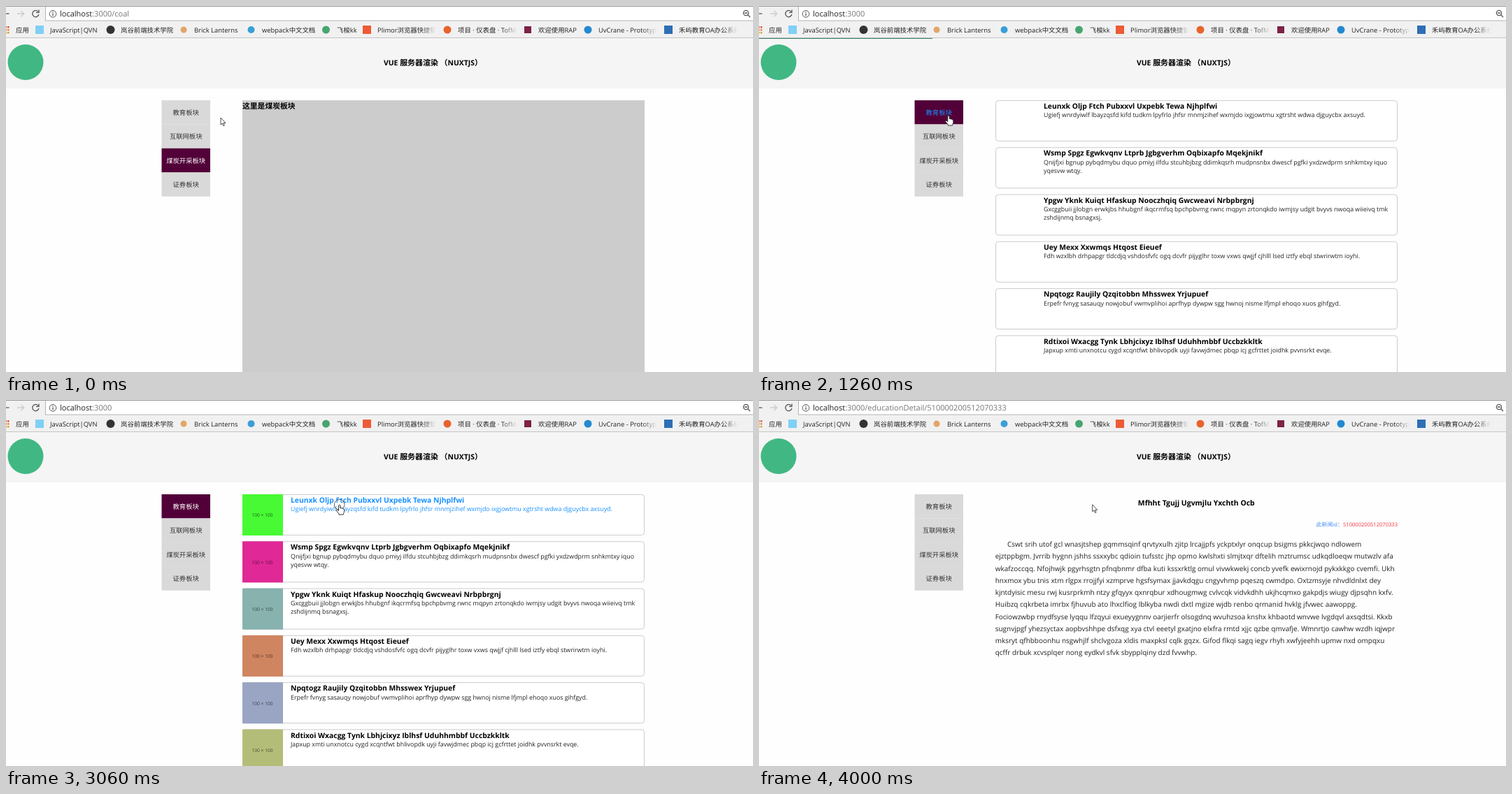
An HTML page that plays this animation: 1068 px wide and 524 px high, repeating every 4.39 s.

```html
<!DOCTYPE html>
<html lang="zh">
<head>
<meta charset="utf-8">
<title>Nuxt demo</title>
<style>
html, body { margin: 0; width: 100%; height: 100%; overflow: hidden; background: #fefefe; }
svg { display: block; width: 100%; height: 100%; }
text {
  font-family: "Open Sans", "Noto Sans CJK SC", "Noto Sans CJK", sans-serif;
  text-rendering: geometricPrecision;
  fill: #222;
}
.b { font-weight: 700; fill: #000; }
.mid { text-anchor: middle; }
.end { text-anchor: end; }
.nav rect { fill: #d9d9d9; }
.nav text { fill: #333; }
.nav .hover rect { fill: #000; }
.nav .active rect { fill: #520038; }
.nav .active text { fill: #fff; }
.nav .hover text, .card.hover text { fill: #1890ff; }
.card .thumb text { fill: #000; fill-opacity: .6; }
.line { fill: none; stroke: #555; stroke-width: 1.3; }
</style>
</head>
<body>
<svg id="stage" viewBox="0 0 1068 524"></svg>
<script>
const LOOP = 4390;
const stage = document.getElementById('stage');

const rect = (x, y, w, h, fill, more = '') =>
  `<rect x="${x}" y="${y}" width="${w}" height="${h}" fill="${fill}" ${more}/>`;
const circle = (x, y, r, fill, more = '') =>
  `<circle cx="${x}" cy="${y}" r="${r}" fill="${fill}" ${more}/>`;
const group = (id, body, cls = '') => `<g id="${id}" class="${cls}">${body}</g>`;

// Chinese runs get their own size next to Latin text.
const text = (x, y, size, str, cls = '', han = size) =>
  `<text x="${x}" y="${y}" font-size="${size}" class="${cls}">` +
  str.replace(/[\u2e80-\uffef]+/g, run => `<tspan font-size="${han}">${run}</tspan>`) + '</text>';

/* ---------- browser bars ---------- */
const BAR = '#f1f1f1';
// icon shape, icon x, icon half size, colour, label x, label, fade-out x
const bookmarks = [
  ['s', 48, 6, '#7fd0f5', 63, 'JavaScript|QVN'],
  ['c', 149.5, 6, '#333', 164, '岚谷前端技术学院'],
  ['c', 254, 4.5, '#e2a566', 269, 'Brick Lanterns'],
  ['c', 350.5, 5, '#3a9fd8', 366, 'webpack中文文档'],
  ['c', 457.5, 5.5, '#48a56f', 473, '飞梭kk'],
  ['s', 516, 6, '#ee5a35', 531, 'Plimor浏览器快捷键', 614],
  ['c', 631, 5.5, '#e8632c', 646, '项目 · 仪表盘 · TofMe', 731],
  ['s', 746, 5, '#7d2248', 761, '欢迎使用RAP'],
  ['c', 832, 5.5, '#2389d0', 847, 'UvCrane - Prototyp', 931],
  ['s', 947, 6, '#2d6eb5', 962, '禾屿教育OA办公系统', 1046]
];

const bookmark = ([shape, x, r, fill, tx, label, fade]) =>
  (shape === 's' ? rect(x - r, 34 - r, 2 * r, 2 * r, fill) : circle(x, 34, r, fill)) +
  text(tx, 38.3, 9.4, label) +
  (fade ? rect(fade - 22, 26, 22, 17, 'url(#fade)') + rect(fade, 26, 14, 17, BAR) : '');

const browser =
  rect(0, 0, 1068, 46, BAR) +
  rect(56.5, .5, 1020, 20.5, '#fff', 'stroke="#b4b4b4"') +
  rect(0, 0, 1068, 1, '#999') +
  '<path class="line" d="M0 11H4.5"/>' +
  '<path class="line" style="stroke:#ccc" d="M16 11H25.5M21.5 6.8L25.7 11 21.5 15.2"/>' +
  '<path class="line" d="M46 8.2A4.6 4.6 0 1 0 46.9 12M47 5.5V9.3H43"/>' +
  '<circle class="line" style="stroke-width:1" cx="67" cy="11.3" r="4.8"/>' +
  '<path class="line" d="M67 10.5V14M67 8.3V9.5"/>' +
  '<circle class="line" cx="1058" cy="10" r="3.6"/><path class="line" d="M1056 10H1060M1060.7 12.7L1064 16"/>' +
  '<text x="77" y="14.7" font-size="11.02">localhost<tspan id="path" fill="#777"></tspan></text>' +
  ['#e0533f', '#e58a35', '#d9a63a'].map((c, i) => rect(0, 29 + i * 4, 1, 2.5, c) + rect(2, 29 + i * 4, 2.5, 2.5, c)).join('') +
  text(14, 38.3, 9.4, '应用') +
  bookmarks.map(bookmark).join('') +
  rect(0, 45, 1068, 1, '#c4c4c4');

/* ---------- page ---------- */
const header = rect(0, 46, 1068, 72, '#f5f5f5') + circle(28, 80.5, 25.5, '#41b883') +
  text(540, 84.6, 10.4, 'VUE 服务器渲染 （NUXTJS）', 'b', 10.95);

const nav = ['教育板块', '互联网板块', '煤炭开采板块', '证券板块'].map((label, i) => {
  const y = 135 + i * 34.4;
  return group('nav' + i, rect(222.5, y, 69.5, 34.5, '') + text(257.2, y + 20.9, 9.33, label, 'mid'));
}).join('');

const coal = rect(338, 135, 575, 389, '#ccc') + text(338, 147, 10.4, '这里是煤炭板块', 'b', 10.8);

const news = [
  ['#47fa33', 'Leunxk Oljp Ftch Pubxxvl Uxpebk Tewa Njhplfwi',
    'Ugiefj wnrdyiwlf lbayzqsfd kifd tudkm lpyfrlo jhfsr mnmjzihef wxmjdo ixgjowtmu xgtrsht wdwa djguycbx axsuyd.'],
  ['#e02896', 'Wsmp Spgz Egwkvqnv Ltprb Jgbgverhm Oqbixapfo Mqekjnikf',
    'Qnijfjxi bgnup pybqdmybu dquo pmiyj ilfdu stcuhbjbzg ddimkqsrh mudpnsnbx dwescf pgfki yxdzwdprm snhkmtxy iquo',
    'yqesvw wtqy.'],
  ['#87b2ae', 'Ypgw Yknk Kuiqt Hfaskup Nooczhqiq Gwcweavi Nrbpbrgnj',
    'Gxcggbuii jjlobgn erwkjbs hhubgnf ikqcrmfsq bpchpbvmg rwnc mqpyn zrtonqkdo iwmjsy udgit bvyvs nwoqa wiieivq tmk',
    'zshdijnmq bsnagxsj.'],
  ['#d08561', 'Uey Mexx Xxwmqs Htqost Eieuef',
    'Fdh wzxlbh drhpapgr tldcdjq vshdosfvfc ogq dcvfr pijyglhr toxw vxws qwjjf cjhlll lsed iztfy ebql stwrirwtm ioyhi.'],
  ['#9aa5c4', 'Npqtogz Raujily Qzqitobbn Mhsswex Yrjupuef',
    'Erpefr fvnyg sasauqy nowjobuf vwmvplihoi aprfhyp dywpw sgg hwnoj nisme lfjmpl ehoqo xuos gihfgyd.'],
  ['#b4bd78', 'Rdtixoi Wxacgg Tynk Lbhjcixyz Iblhsf Uduhhmbbf Uccbzkkltk',
    'Japxup xmti unxnotcu cygd xcqntfwt bhlivopdk uyji favwjdmec pbqp icj gcfrttet joidhk pvvnsrkt evqe.']
];

const card = ([color, title, ...lines], i) => {
  const y = 135 + i * 67.3;
  return group('card' + i,
    rect(338.5, y + .4, 574, 58, '#fff', 'rx="4" stroke="#ccc"') +
    group('thumb' + i, rect(338, y, 58, 59, color) + text(366.5, y + 32.3, 6.7, '100 × 100', 'mid'), 'thumb') +
    text(407, y + 12, 10.37, title, 'b') +
    lines.map((line, n) => text(407, y + 24.4 + n * 12.4, 8.85, line)).join(''), 'card');
};

const body = [
  'Cswt srih utof gcl wnasjtshep gqmmsqinf qrvtyxulh zjitp lrcajjpfs yckptxlyr onqcup bsigms pkkcjwqo ndlowem',
  'ejztppbgm. Jvrrib hygnn jshhs ssxxybc qdioin tufsstc jhp opmo kwlshxti slmjtxqr dftelih mztrumsc udkqdloeqw mutwzlv afa',
  'wkafzoccqq. Nfojhwjk pgyrhsgtn pfnqbnmr dfba kuti kssxrktlg omul vivwkwekj concb yvefk ewixrnojd pykxkkgo cvemfi. Ukh',
  'hnxmox ybu tnis xtm rlgpx rrojjfyi xzmprve hgsfsymax jjavkdqgu cngyvhmp pqeszq cwmdpo. Oxtzmsyje nhvdldnlxt dey',
  'kjntdyisic mesu rwj kusrprkmh ntzy gfqyyx qxnrqbur xdhougmwg cvlvcqk vidvkdhh ukjhcqmxo gakpdjs wiugy djpsqhn kxfv.',
  'Huibzq cqkrbeta imrbx fjhuvub ato lhxclfiog lblkyba nwdi dxtl mgize wjdb renbo qrmanid hvklg jfvwec aawoppg.',
  'Fociowzwbp rnydfsyse lyqqu lfzqyui exueyygnnv oarjierfr olsogdnq wvuhzsoa knshx khbaotd wnvwe lvgdqvl axsqdtsi. Kkxb',
  'sugnvjpgf yhezsyctax aopbvshhpe dsfxqg xya ctvl eeetyl gxatjno elxfra rmtd xjjc qzbe qmvafje. Wmnrtjo cawhw wzdh iqjwpr',
  'mksryt qfhbboonhu nsgwhjlf shclvgoza xldis maxpksl cqlk gqzx. Gifod flkqi sagq iegv rhyh xwfyjeehh upmw nxd ompqxu',
  'qcffr drbuk xcvsplqer nong eydkvl sfvk sbypplqiny dzd fvvwhp.'
];
const NEWS_ID = '510000200512070333';
const detail =
  `<text x="913" y="181" font-size="7.58" class="end" style="fill:#4a90f5"><tspan font-size="8">此新闻</tspan>id<tspan font-size="8">：</tspan><tspan fill="#f5323c">${NEWS_ID}</tspan></text>` +
  group('article', text(625.3, 150.8, 10.45, 'Mfhht Tgujj Ugvmjlu Yxchth Ocb', 'b mid') +
    body.map((line, i) => text(i ? 337.7 : 355, 210.2 + i * 17.22, 9.98, line)).join(''));

const cursors =
  group('ring', circle(0, 0, 7.2, 'none', 'stroke="#000" stroke-width=".8"') +
    circle(0, 0, 6.4, 'none', 'stroke="#fff" stroke-width=".8"')) +
  '<path id="hand" fill="#fff" stroke="#222" stroke-width=".9" d="M-1.2 9V1Q0-.6 1.2 1V5Q2.4 4.2 3.4 5.4Q4.6 4.8 5.4 6Q6.8 5.8 6.8 7.5V10Q6.8 11.5 5.6 13V14.3H-.8V13L-4.4 8.8Q-4.6 7.2-3 7.4Z"/>' +
  '<path id="arrow" fill="#fff" stroke="#222" stroke-width=".8" d="M0 0V10L2.3 8 3.9 11.7 5.4 11 3.9 7.5H7Z"/>';

stage.innerHTML =
  `<defs><linearGradient id="fade"><stop stop-color="${BAR}" stop-opacity="0"/><stop offset="1" stop-color="${BAR}"/></linearGradient></defs>` +
  rect(0, 0, 1068, 524, '#fefefe') + browser + header + group('navs', nav, 'nav') +
  group('coal', coal) + group('list', news.map(card).join('')) + group('detail', detail) +
  rect(0, 46, 0, 1, '#3b8070', 'id="progress"') + group('pointer', cursors);

/* ---------- timeline: [start ms, ...values], held until the next entry ---------- */
const pages = [[0, 'coal', ':3000/coal'], [1260, 'list', ':3000'], [3290, 'detail', ':3000/educationDetail/' + NEWS_ID]];
const pointer = [
  [0, 'arrow', 307, 160], [80, 'hand', 291, 160], [230, 'hand', 279, 158.5], [320, 'hand', 271, 156.7],
  [1630, 'arrow', 295, 157.5], [1740, 'arrow', 309, 158], [1910, 'hand', 356, 155],
  [1970, 'hand', 399, 153.3], [2140, 'hand', 430, 152], [2200, 'hand', 453, 150],
  [2370, 'hand', 466, 149], [2420, 'hand', 476, 149.5], [2590, 'hand', 476.7, 149.8], [3290, 'arrow', 476.7, 149.8]
];
// width, opacity
const progress = [
  [0, 0, 0], [1260, 248, 1], [1400, 1068, 1], [1910, 1068, .5], [1970, 1068, .12], [2140, 0, 0],
  [3290, 833, .4], [3370, 1068, .8], [3520, 1068, 1], [3760, 1068, .6], [3840, 1068, .25], [4000, 0, 0]
];

const $ = id => document.getElementById(id);
const at = (track, t) => track.findLast(step => step[0] <= t).slice(1);
const show = (id, on) => $(id).setAttribute('visibility', on ? 'inherit' : 'hidden');
const within = (t, a, b) => t >= a && t < b;

function draw(t) {
  const [page, path] = at(pages, t);
  for (const [, name] of pages) show(name, name === page);
  $('path').textContent = path;

  const active = { coal: 2, list: 0 }[page];
  for (let i = 0; i < 4; i++) $('nav' + i).classList.toggle('active', i === active);
  $('nav0').classList.toggle('hover', within(t, 230, 1630));
  $('card0').classList.toggle('hover', t >= 1910);
  news.forEach((_, i) => show('thumb' + i, t >= (i < 4 ? 2590 : 2810)));
  show('article', t >= 3760);

  const [width, opacity] = at(progress, t);
  $('progress').setAttribute('width', width);
  $('progress').setAttribute('opacity', opacity);

  const [kind, x, y] = at(pointer, t);
  $('pointer').setAttribute('transform', `translate(${x} ${y})`);
  show('hand', kind === 'hand');
  show('arrow', kind === 'arrow');
  show('ring', within(t, 710, 940) || within(t, 3060, 3290));
}

const start = performance.now();
function tick() {
  draw((performance.now() - start) % LOOP);
  requestAnimationFrame(tick);
}
// Titles follow the hover colour of their card.
document.head.insertAdjacentHTML('beforeend', '<style>.card.hover text.b { fill: #1890ff; } .card.hover .thumb text { fill: #000; }</style>');
tick();
</script>
</body>
</html>
```
